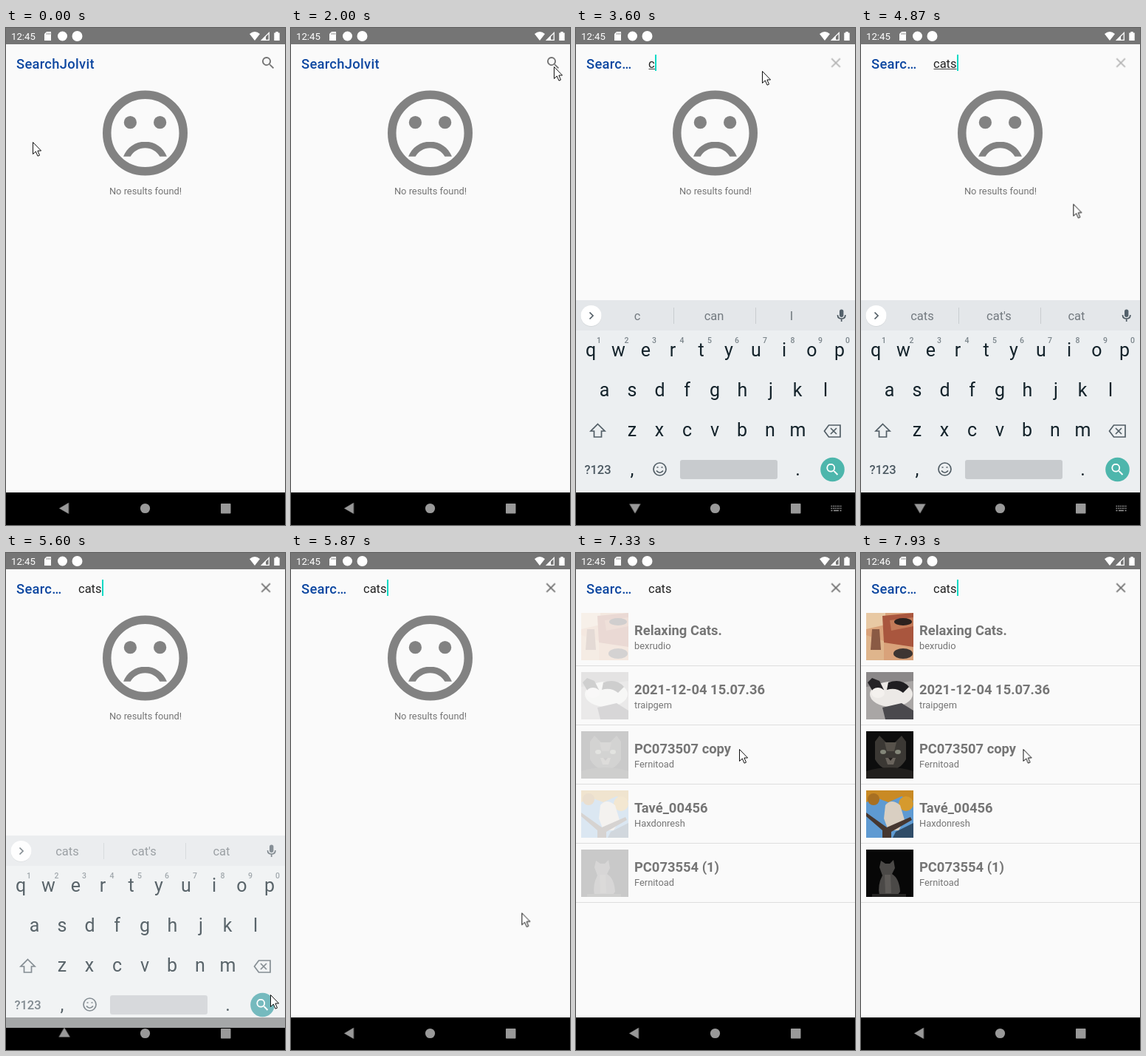
An HTML page for the animation above (8 s loop, 378x672 px).

```html
<!DOCTYPE html>
<html lang="en">
<head>
<meta charset="utf-8">
<title>Photo search</title>
<style>
html, body { margin: 0; width: 100%; height: 100%; overflow: hidden; background: #fafafa; }
svg { display: block; }
text { font-family: Roboto, sans-serif; }
.title { font-size: 18.36px; font-weight: 500; letter-spacing: .3px; fill: #0d47a1; }
.query { font-size: 16.5px; fill: #212121; }
.hint { font-size: 16.5px; fill: #9e9e9e; }
.note { font-size: 12.85px; fill: #757575; }
.name { font-size: 18.36px; font-weight: 700; fill: #757575; }
.keys { font-size: 25px; fill: #14232b; text-anchor: middle; }
.digits { font-size: 10.5px; font-weight: 500; fill: #7b858b; text-anchor: middle; }
.picks text { font-size: 16.5px; fill: #72797f; text-anchor: middle; }
.line { fill: none; stroke: #525e66; stroke-width: 1.7; }

/* one shared 8 s timeline: 1% = 80 ms */
[class*="t-"] { animation: 8s step-end infinite; }
.t-idle { animation-name: idle; }
.t-open { animation-name: open; }
.t-empty { animation-name: empty; }
.t-typed { animation-name: typed; }
.t-c { animation-name: c; }
.t-ca { animation-name: ca; }
.t-cat { animation-name: cat; }
.t-cats { animation-name: cats; }
.t-compose { animation-name: compose; }
.t-blink { animation-name: blink; }
.t-caret { animation-name: caret; }
.t-clear { animation-name: clear; }
.t-board { animation-name: board; }
.t-press { animation-name: press; }
.t-ime { animation-name: ime; }
.t-back { animation-name: back; }
.t-sad { animation-name: sad; }
.t-list { animation-name: list; }
.t-photo { animation-name: photo; }
.t-before { animation-name: before; }
.t-after { animation-name: after; }
.t-mouse { animation-name: mouse; }

@keyframes idle { 0% { opacity: 1 } 25.875% { opacity: 0 } }
@keyframes open { 0% { opacity: 0 } 25.875% { opacity: 1 } }
@keyframes empty { 0% { opacity: 1 } 45% { opacity: 0 } }
@keyframes typed { 0% { opacity: 0 } 45% { opacity: 1 } }
@keyframes c { 0% { opacity: 0 } 45% { opacity: 1 } 46.625% { opacity: 0 } }
@keyframes ca { 0% { opacity: 0 } 46.625% { opacity: 1 } 50.875% { opacity: 0 } }
@keyframes cat { 0% { opacity: 0 } 50.875% { opacity: 1 } 55% { opacity: 0 } }
@keyframes cats { 0% { opacity: 0 } 55% { opacity: 1 } }
@keyframes compose { 0% { opacity: 1 } 69.125% { opacity: 0 } }
@keyframes blink {
  0%, 40%, 67.875%, 81.625%, 95% { opacity: 1 }
  33.375%, 61.625%, 75.375%, 88.375% { opacity: 0 }
}
@keyframes caret {
  0% { transform: none; fill: #4580b0 }
  45% { transform: translateX(9px); fill: #03dac5 }
  46.625% { transform: translateX(18px); fill: #03dac5 }
  50.875% { transform: translateX(24px); fill: #03dac5 }
  55% { transform: translateX(32px); fill: #03dac5 }
}
@keyframes clear { 0% { fill: #b4b4b4 } 69.125% { fill: #6f6f6f } }
@keyframes board {
  0%, 72.5% { opacity: 0; transform: translateY(30px) }
  28.375% { opacity: .3; transform: translateY(22px) }
  29.125% { opacity: .6; transform: translateY(14px) }
  30% { opacity: .82; transform: translateY(8px) }
  30.875% { opacity: .94; transform: translateY(3px) }
  31.625% { opacity: 1; transform: none }
  70% { opacity: .7; transform: translateY(14px) }
  70.875% { opacity: .4; transform: translateY(22px) }
  71.625% { opacity: .15; transform: translateY(28px) }
}
@keyframes press { 0%, 72.5% { fill: #4db6ac } 69.125% { fill: #3b9ea4 } }
@keyframes ime { 0%, 69.125% { opacity: 0 } 28.375% { opacity: 1 } }
@keyframes back {
  0%, 72.5% { transform: none }
  28.375% { transform: rotate(-25deg) }
  29.125% { transform: rotate(-50deg) }
  30% { transform: rotate(-72deg) }
  30.875% { transform: rotate(-85deg) }
  31.625% { transform: rotate(-90deg) }
  69.125% { transform: rotate(90deg) }
  70.875% { transform: rotate(60deg) }
  71.625% { transform: rotate(25deg) }
}
@keyframes sad { 0% { opacity: 1 } 83.375% { opacity: 0 } }
@keyframes list {
  0% { opacity: 0 }
  88.375% { opacity: 0; animation-timing-function: steps(4, start) }
  91.625%, 100% { opacity: 1 }
}
@keyframes photo {
  0% { opacity: 0 }
  91.625% { opacity: 0; animation-timing-function: steps(5, start) }
  97%, 100% { opacity: 1 }
}
@keyframes before { 0% { opacity: 1 } 92.5% { opacity: 0 } }
@keyframes after { 0% { opacity: 0 } 92.5% { opacity: 1 } }
@keyframes mouse {
  0% { transform: translate(36px, 154px) }
  2.5% { transform: translate(36px, 154px); animation-timing-function: steps(7, start) }
  8.3% { transform: translate(174px, 39px) }
  11.625% { transform: translate(174px, 39px); animation-timing-function: steps(3, start) }
  14.2% { transform: translate(232px, 75px) }
  18.375% { transform: translate(232px, 75px); animation-timing-function: steps(2, start) }
  20% { transform: translate(286px, 50px) }
  21.625% { transform: translate(286px, 50px); animation-timing-function: steps(5, start) }
  25.8% { transform: translate(356px, 52px) }
  32.5% { transform: translate(356px, 52px); animation-timing-function: steps(4, start) }
  35.8% { transform: translate(252px, 58px) }
  59.125% { transform: translate(252px, 58px); animation-timing-function: steps(9, start) }
  66.7% { transform: translate(358px, 597px) }
  71.625% { transform: translate(358px, 597px); animation-timing-function: steps(9, start) }
  79.2% { transform: translate(221px, 265px) }
  98.375% { transform: translate(221px, 265px); animation-timing-function: steps(2, start) }
  100% { transform: translate(218px, 265px) }
}
</style>
</head>
<body>
<svg width="378" height="672" viewBox="0 0 378 672">
  <defs>
    <path id="lens" d="M15.5 14h-.79l-.28-.27A6.5 6.5 0 1 0 13.73 14.43l.27.28v.79l5 4.99L20.49 19zM9.5 14a4.5 4.5 0 1 1 0-9 4.5 4.5 0 0 1 0 9z"/>
    <path id="cross" d="M19 6.41 17.59 5 12 10.59 6.41 5 5 6.41 10.59 12 5 17.59 6.41 19 12 13.41 17.59 19 19 17.59 13.41 12z"/>
  </defs>
  <rect width="378" height="672" fill="#fafafa"/>

  <!-- status bar -->
  <rect width="378" height="22" fill="#757575"/>
  <g fill="#fff">
    <g font-size="13.2">
      <text class="t-before" x="7" y="16">12:45</text>
      <text class="t-after" x="7" y="16">12:46</text>
    </g>
    <path d="M55 5h6v12h-9V8z"/>
    <path d="M55.5 6.5v2.5M57.5 6.5v2.5M59.5 6.5v2.5" stroke="#757575" stroke-width=".8"/>
    <circle cx="76.5" cy="11" r="6.5"/>
    <circle cx="96.5" cy="11" r="7"/>
    <path d="M330 8q7-6 14 0l-7 9z"/>
    <path d="M346.500 16.300H356.300V6.500z" fill="none" stroke="#fff" stroke-width="1.3"/>
    <path d="M345.500 16.900 352 10.500V16.900z"/>
    <path d="M363.300 6.500h2V5h3.400v1.500h2V17h-7.400z"/>
  </g>

  <!-- app bar -->
  <g class="t-idle">
    <text class="title" x="14" y="54.500">SearchJolvit</text>
    <use href="#lens" transform="translate(344.300 36.300) scale(.918)" fill="#757575"/>
  </g>
  <g class="t-open">
    <text class="title" x="14" y="54.500">Searc…</text>
    <g class="t-empty">
      <use href="#lens" transform="translate(102.400 38.600) scale(.88)" fill="#a8a8a8"/>
      <text class="hint" x="127" y="55">Search...</text>
    </g>
    <g class="query">
      <text class="t-c" x="98" y="53.500">c</text>
      <text class="t-ca" x="98" y="53.500">ca</text>
      <text class="t-cat" x="98" y="53.500">cat</text>
      <text class="t-cats" x="98" y="53.500">cats</text>
    </g>
    <g class="t-compose" fill="#424242">
      <rect class="t-c" x="98.500" y="55" width="8.500" height="1"/>
      <rect class="t-ca" x="98.500" y="55" width="17.500" height="1"/>
      <rect class="t-cat" x="98.500" y="55" width="23" height="1"/>
      <rect class="t-cats" x="98.500" y="55" width="31" height="1"/>
    </g>
    <g class="t-blink"><rect class="t-caret" x="98" y="36" width="2" height="22"/></g>
    <g class="t-clear"><use href="#cross" transform="translate(341 36) scale(.918)"/></g>
  </g>

  <!-- empty state -->
  <g class="t-sad">
    <g transform="translate(188.500 142) scale(5.75) translate(-12 -12)" fill="#828282">
      <circle cx="12" cy="12" r="9" fill="none" stroke="#828282" stroke-width="2"/>
      <circle cx="8.500" cy="9.500" r="1.500"/>
      <circle cx="15.500" cy="9.500" r="1.500"/>
      <path d="M12 14c-2.330 0-4.320 1.450-5.120 3.500h1.670c.69-1.190 1.970-2 3.450-2s2.750.81 3.450 2h1.670c-.8-2.050-2.790-3.500-5.120-3.500z"/>
    </g>
    <text class="note" x="189" y="224.500" text-anchor="middle">No results found!</text>
  </g>

  <!-- results -->
  <g class="t-list">
    <path d="M0 152.500H378M0 232.500H378M0 312.500H378M0 392.500H378M0 472.500H378" stroke="#dedede"/>
    <g class="name">
      <text x="79" y="111">Relaxing Cats.</text>
      <text x="79" y="191">2021-12-04 15.07.36</text>
      <text x="79" y="271">PC073507 copy</text>
      <text x="79" y="351">Tavé_00456</text>
      <text x="79" y="431">PC073554 (1)</text>
    </g>
    <g class="note">
      <text x="79" y="130">bexrudio</text>
      <text x="79" y="210">traipgem</text>
      <text x="79" y="290">Fernitoad</text>
      <text x="79" y="370">Haxdonresh</text>
      <text x="79" y="450">Fernitoad</text>
    </g>
    <g class="t-photo">
      <svg x="7" y="81" width="64" height="64">
        <rect width="64" height="64" fill="#d9a27a"/>
        <path d="M0 0h26v16L0 22z" fill="#e8c9a4"/>
        <path d="M22 4 64 0v46L24 40z" fill="#a9563e"/>
        <path d="M32 10 64 6v12l-30 6z" fill="#c37a58"/>
        <ellipse cx="50" cy="12" rx="12" ry="5" fill="#2b211e"/>
        <path d="M0 30 24 38v26H0z" fill="#dfb58c"/>
        <path d="M8 22h10l2 28H6z" fill="#8a5a44"/>
        <ellipse cx="50" cy="55" rx="13" ry="7" fill="#3d3532"/>
      </svg>
      <svg x="7" y="161" width="64" height="64">
        <rect width="64" height="64" fill="#a9a6a5"/>
        <path d="M0 0h64v12L0 20z" fill="#8b8889"/>
        <ellipse cx="34" cy="30" rx="29" ry="17" fill="#ece9e6"/>
        <path d="M2 14 8 8l10 4 6 12-14 4z" fill="#252326"/>
        <path d="M30 14q18-6 28 6l-8 8q-10-8-22-4z" fill="#1f1e21"/>
        <ellipse cx="16" cy="28" rx="9" ry="7" fill="#f4f1ee"/>
        <path d="M22 48 48 42l16 10v12H26z" fill="#4a494d"/>
      </svg>
      <svg x="7" y="241" width="64" height="64">
        <rect width="64" height="64" fill="#0d0d0d"/>
        <path d="M12 14 18 6l9 9h12l9-9 6 8v24q-8 14-21 14T12 38z" fill="#3b3834"/>
        <path d="M25 15h16l-3 12H28z" fill="#57524b"/>
        <ellipse cx="23" cy="28" rx="4" ry="3" fill="#84877a"/>
        <ellipse cx="43" cy="28" rx="4" ry="3" fill="#84877a"/>
        <path d="M26 36h14l-3 9h-8z" fill="#6a645d"/>
        <path d="M30 36h6l-3 4z" fill="#26211f"/>
        <path d="M0 54q32-10 64 0v10H0z" fill="#211f1d"/>
      </svg>
      <svg x="7" y="321" width="64" height="64">
        <rect width="64" height="64" fill="#5e9ad2"/>
        <path d="M0 0h64v14L48 8 30 16 14 10 0 16z" fill="#c98a24"/>
        <circle cx="54" cy="18" r="10" fill="#d69a2d"/>
        <circle cx="10" cy="12" r="8" fill="#a87022"/>
        <path d="M26 20q8-10 20 0l6 20-8 14H30L24 38z" fill="#d9cfc2"/>
        <path d="M0 30 28 50 60 36 62 40 34 56v8H22V54L0 35z" fill="#463730"/>
        <path d="M40 56 64 44v20H36z" fill="#2f4c68"/>
      </svg>
      <svg x="7" y="401" width="64" height="64">
        <rect width="64" height="64" fill="#070707"/>
        <path d="M18 24 20 15l6 4h6l5-5 2 11-4 8q10 6 11 24l-4 5H18q-3-14 4-27z" fill="#4b4947"/>
        <path d="M25 34h8l1 25h-8z" fill="#5e5b58"/>
        <path d="M8 60h46v4H8z" fill="#242322"/>
      </svg>
    </g>
  </g>

  <!-- system navigation and keyboard -->
  <rect y="628" width="378" height="44"/>
  <g class="t-board">
    <rect y="368" width="378" height="260" fill="#eceff1"/>
    <rect y="368" width="378" height="41" fill="#e4e7ea"/>
    <rect y="628" width="378" height="44"/>
    <circle cx="20.500" cy="389.800" r="14" fill="#cfd3d6"/>
    <circle cx="20.500" cy="389" r="14" fill="#fff"/>
    <g class="t-empty">
      <path class="line" d="M23 384.500 18.500 389l4.500 4.500"/>
      <use href="#lens" transform="translate(61.500 378.500) scale(.9)" fill="#616c74"/>
      <path class="line" d="M120 383q0-1.500 1.500-1.500h11q1.500 0 1.500 1.500v8l-5 5h-7.500q-1.500 0-1.500-1.500zM134 391h-5v5M123 389q3.500 4 7 0M124 385h1M129 385h1"/>
      <text x="182" y="393.500" font-size="13" font-weight="900" fill="#616c74" text-anchor="middle">GIF</text>
      <rect x="231" y="382" width="15" height="15" fill="#69747c"/>
      <path d="M271.500 379v20" stroke="#cbd0d3"/>
      <g fill="#616c74"><circle cx="300" cy="389" r="2"/><circle cx="306" cy="389" r="2"/><circle cx="312" cy="389" r="2"/></g>
    </g>
    <g class="t-typed picks">
      <path class="line" d="M18.500 384.500 23 389l-4.500 4.500"/>
      <path d="M132.500 378v22M243.500 378v22" stroke="#c9cdd0"/>
      <g class="t-c"><text x="83" y="395">c</text><text x="187" y="395">can</text><text x="292" y="395">I</text></g>
      <g class="t-ca"><text x="83" y="395">ca</text><text x="187" y="395">can</text><text x="292" y="395">cat</text></g>
      <g class="t-cat"><text x="83" y="395">cat</text><text x="187" y="395">cats</text><text x="292" y="395">car</text></g>
      <g class="t-cats"><text x="83" y="395">cats</text><text x="187" y="395">cat's</text><text x="292" y="395">cat</text></g>
    </g>
    <rect x="357" y="380.500" width="5.400" height="10.500" rx="2.700" fill="#53616b"/>
    <path class="line" d="M354.500 388q0 5 5.200 5t5.200-5M359.700 393v4"/>

    <text class="digits" y="425.500" x="31 68.500 106 143.500 181 218 256 293.500 331 368">1234567890</text>
    <g class="keys">
      <text y="444" x="20 57.500 94.500 131 169.500 207 244 282 319.500 357">qwertyuiop</text>
      <text y="498" x="38.500 76 113.500 150.500 188 225.500 264 300 338">asdfghjkl</text>
      <text y="552" x="76 113 150.500 188 225 263 300.500">zxcvbnm</text>
      <text y="605" x="76 300.500">,.</text>
      <text y="603" x="29.500" font-size="16.500" font-weight="500" style="font-size:16.500px;fill:#4c5962">?123</text>
    </g>
    <path class="line" d="M29.500 535.500 39 545h-4.500v8h-10v-8H20z"/>
    <path class="line" d="M342.500 537H358v16h-15.500L336.500 545zM345 541l8 8M353 541l-8 8"/>
    <circle class="line" cx="113.500" cy="596.500" r="8.500"/>
    <path class="line" d="M109 598.500q4.500 5.500 9 0M109.500 594h2M115.500 594h2"/>
    <rect x="141" y="584" width="132" height="26" rx="3" fill="#c8cbce"/>
    <circle class="t-press" cx="347.500" cy="597" r="16.300"/>
    <use href="#lens" transform="translate(336.700 586.200) scale(.9)" fill="#fff"/>
  </g>
  <g fill="#999">
    <g transform="translate(79.500 649)"><path class="t-back" d="M-7.500 .5 5.500-7.200V8z"/></g>
    <circle cx="188.500" cy="649.500" r="6.600"/>
    <rect x="291" y="643" width="13.500" height="13.500" rx=".8"/>
    <g class="t-ime" fill="none" stroke="#999" stroke-width="1.500">
      <path d="M345.500 646.500h14M345.500 649.500h14" stroke-dasharray="1.500 1"/>
      <path d="M345.500 652.500h2M349 652.500h7M357.500 652.500h2"/>
    </g>
  </g>

  <path class="t-mouse" d="M.5 .5V16.500L4.300 13 7 19.200 9.500 18.100 6.900 12H11.600z" fill="#fff" stroke="#111"/>
</svg>
</body>
</html>
```
